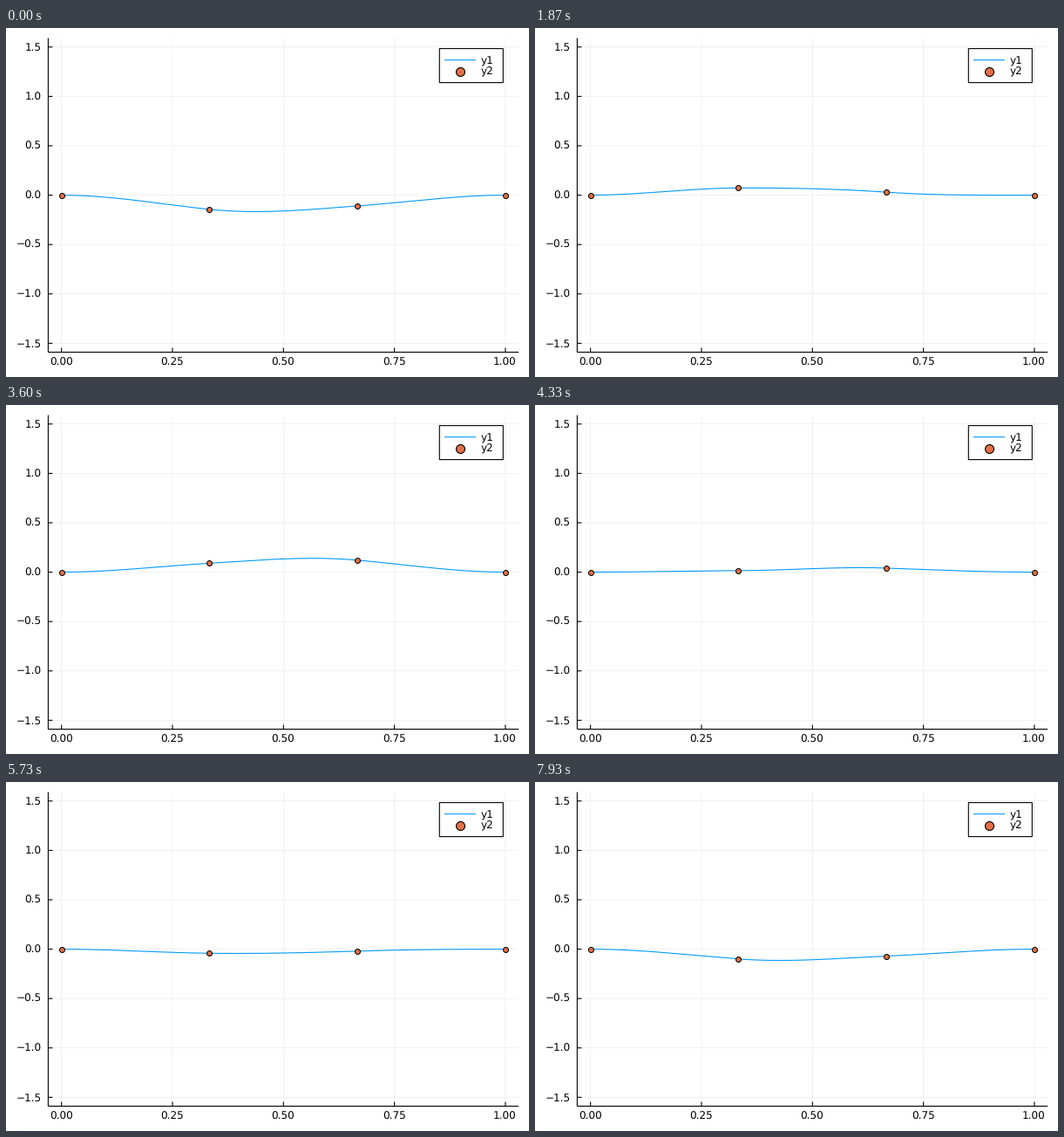
Recreate the animation shown at these times as a matplotlib script. Size 600 by 400 pixels, loop 8 s.

```python
import numpy as np
import matplotlib.pyplot as plt
from matplotlib.animation import FuncAnimation
from matplotlib.patches import Rectangle

W, H, DPI = 600, 400, 100
TICK, LOOP, POSES = 20, 8000, 120   # ms per drawn frame, ms, poses per loop
PX = 72 / DPI                       # points per pixel
LEFT, RIGHT, TOP, BOTTOM = 48.4, 588.2, 11.6, 371.55
BLUE, ORANGE = "#009afa", "#e26f46"

plt.rcParams["font.family"] = "DejaVu Sans"
plt.rcParams["text.hinting"] = "none"

fig = plt.figure(figsize=(W / DPI, H / DPI), dpi=DPI, facecolor="white")
ax = fig.add_axes([0, 0, 1, 1])
ax.set_xlim(0, W)
ax.set_ylim(H, 0)
ax.axis("off")


def px(x):
    return LEFT + (x + 0.03) / 1.06 * (RIGHT - LEFT)


def py(y):
    return TOP + (1.59 - y) / 3.18 * (BOTTOM - TOP)


def line(x, y, color="black", width=1.1, **kw):
    return ax.plot(x, y, color=color, lw=width * PX, snap=False,
                   solid_capstyle="butt", **kw)[0]


def grid(x, y):
    line(x, y, width=0.55, alpha=0.1, zorder=1)


def label(x, y, text, ha, z=2):
    ax.text(x, y, text, ha=ha, va="baseline", fontsize=12 * PX, zorder=z)


def dots(x, y, size, edge, z):
    return ax.plot(x, y, "o", ms=size * PX, mfc=ORANGE, mec="black",
                   mew=edge * PX, snap=False, zorder=z)[0]


def draw_axes():
    for v in np.linspace(0, 1, 5):
        x = px(v)
        grid([x, x], [TOP, BOTTOM])
        line([x, x], [BOTTOM, BOTTOM - 5], zorder=2)
        label(x - 0.4, 387, f"{v:.2f}", "center")
    for v in np.linspace(-1.5, 1.5, 7):
        y = py(v)
        grid([LEFT, RIGHT], [y, y])
        line([LEFT, LEFT + 5], [y, y], zorder=2)
        label(40.5, y + 4, f"{v:.1f}".replace("-", "\u2212"), "right")
    line([LEFT, LEFT], [TOP, BOTTOM], zorder=2)
    line([LEFT, RIGHT], [BOTTOM, BOTTOM], zorder=2)


def draw_legend():
    ax.add_patch(Rectangle((497.3, 23.6), 73, 39, fc="white", ec="black",
                           lw=1.1 * PX, snap=False, zorder=5))
    line([503, 539], [36.7, 36.7], BLUE, zorder=6)
    dots([521], [49.5], 10, 1.1, 6)
    label(544.2, 41, "y1", "left", 6)
    label(544.2, 54, "y2", "left", 6)


# Vibration modes of a clamped beam with three cubic elements:
# amplitude, cycles per pose, phase in cycles, shape (u1, r1, u2, r2)
MODES = [
    (-0.127, 0.11887, -0.012, (1, 1.0611, 1, -1.0611)),
    (-0.0235, 0.3336, 0.140, (1, -0.7976, -1, -0.7976)),
    (0.0022, 0.5381, 0.500, (1, 15.8, -1, 15.8)),
]

T = np.linspace(0, 1, 60)
HERMITE = np.array([1 - 3 * T**2 + 2 * T**3, T * (1 - T)**2,
                    3 * T**2 - 2 * T**3, T**2 * (T - 1)])
X = np.concatenate([(k + T) / 3 for k in range(3)])


def nodes(n):
    """Deflection and scaled slope at the four nodes."""
    q = np.zeros(8)
    for amp, rate, phase, shape in MODES:
        q[2:6] += amp * np.cos(2 * np.pi * (rate * n + phase)) * np.array(shape)
    return q


draw_axes()
draw_legend()
curve = line(px(X), py(0 * X), BLUE, zorder=3)
marks = dots(px(np.arange(4) / 3), [py(0)] * 4, 6, 1.0, 4)


def update(frame):
    # a pose is held for 60 or 70 ms, 15 poses a second
    q = nodes((frame * TICK + 15) * POSES // LOOP)
    y = np.concatenate([q[2 * k:2 * k + 4] @ HERMITE for k in range(3)])
    curve.set_ydata(py(y))
    marks.set_ydata(py(q[::2]))
    return curve, marks


anim = FuncAnimation(fig, update, frames=LOOP // TICK, interval=TICK,
                     repeat=True, repeat_delay=0)
plt.show()
```
